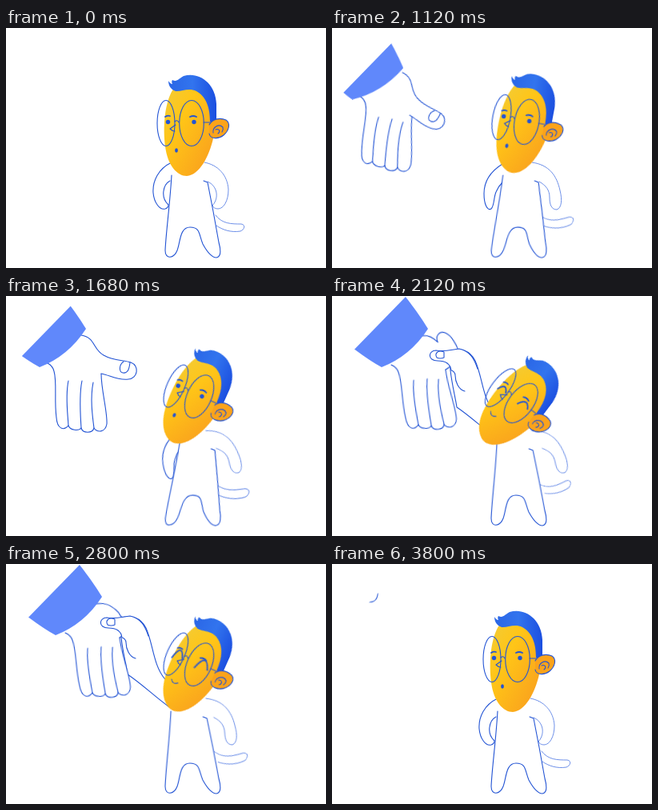
An HTML page without scripts for the animation above (3840 ms loop, 400x300 px).

```html
<!DOCTYPE html>
<html lang="en">
<head>
<meta charset="utf-8">
<title>Handshake</title>
<style>
html, body { margin: 0; width: 100%; height: 100%; overflow: hidden; background: #fff; }
svg { display: block; width: 100vw; height: 100vh; }
.line { fill: none; stroke: #2354d4; stroke-width: 1.1; stroke-linecap: round; stroke-linejoin: round; }
.skin { fill: #fff; }
.thin { stroke: #4a74e2; stroke-width: .8; }
.bold { stroke-width: 1.8; }
.ink { fill: #2354d4; stroke: none; }

/* Each part turns about its own joint. */
.move { animation: 3.84s ease-in-out infinite; }
.toggle { animation: 3.84s step-end infinite; }
.head { animation-name: head; transform-origin: 219px 117px; }
.torso { animation-name: torso; transform-origin: 230px 280px; }
.tail { animation-name: tail; transform-origin: 264px 240px; }
.left-arm { animation-name: left-arm, left-bend; transform-origin: 213px 169px; }
.right-arm { animation-name: right-arm, right-bend; transform-origin: 252px 170px; }
.reach { animation-name: reach; transform-origin: 200px 165px; }
.slide { animation-name: slide; transform-origin: 73px 66px; }
.palm { animation-name: palm; transform-origin: 73px 66px; }
.thumb-turn { animation-name: thumb-turn; transform-origin: 110px 80px; }
.thumb { animation-name: thumb; }
.smile-eye { animation-name: smile-eye; transform-box: fill-box; transform-origin: center; vector-effect: non-scaling-stroke; }
.apart { animation-name: apart; }
.together { animation-name: together; }
.neutral { animation-name: neutral; }
.happy { animation-name: happy; }

@keyframes head {
  0%, 9%, 98.9%, 100% { transform: none; }
  29.17% { transform: translate(12px, -4px) rotate(10.6deg); }
  43.75%, 72.9% { transform: translate(11.5px, 1.5px) rotate(24deg); }
  55.2% { transform: translate(8px, 7.5px) rotate(37deg); }
  86.46% { transform: translate(16px, -4px) rotate(12.8deg); }
}
@keyframes torso {
  0%, 9%, 98.9%, 100% { transform: none; }
  29.17%, 86.46% { transform: skewX(-4deg); }
  43.75% { transform: skewX(-6deg); }
  55.2%, 72.9% { transform: skewX(.5deg); }
}
@keyframes tail {
  0%, 98.9%, 100% { transform: none; }
  29.17%, 72.9% { transform: rotate(-16deg) scale(1.08); }
  43.75%, 86.46% { transform: rotate(-8deg) scale(1.15); }
  55.2% { transform: rotate(-27deg); }
}
@keyframes left-arm {
  0%, 29.17%, 98.9%, 100% { transform: none; }
  43.75%, 86.46% { transform: rotate(-9deg); }
}
@keyframes left-bend {
  0%, 9%, 98.9%, 100% { d: path("M207 168C190 176 183 192 184 206C185 218 192 228 199 226C202 225 203 223 203 221C193 212 196 196 205 191"); }
  29.17%, 86.46% { d: path("M213 170C197 180 190 193 190 207C190 220 194 229 199 226C203 222 202 212 205 205C207 200 210 196 213 193"); }
}
@keyframes right-arm {
  0%, 29.17%, 98.9%, 100% { transform: none; }
  43.75%, 55.2% { transform: rotate(-10deg); }
  72.9%, 86.46% { transform: rotate(-2deg); }
}
@keyframes right-bend {
  0%, 9%, 98.9%, 100% { d: path("M248 168C265 171 277 184 278 202C278 216 272 226 265 226C261 226 259 224 258 222C267 212 264 197 252 192"); }
  29.17%, 86.46% { d: path("M250 168C272 171 281 185 285 203C288 215 287 225 281 227C274 227 272 220 272 212C272 203 268 197 259 192"); }
}
@keyframes reach {
  0%, 45.8%, 81.3%, 100% { transform: rotate(-70deg) scale(.55); }
  55.2% { transform: translate(4px, 1px); }
  73% { transform: none; }
}

@keyframes slide {
  0%, 15.3% { transform: translate(-60px, -134px) rotate(8deg); animation-timing-function: ease-out; }
  29.17% { transform: translate(-14px, 5px) rotate(8deg); }
  43.75% { transform: none; }
  55.2%, 72.9% { transform: translate(20px, 0); }
  86.46% { transform: translate(-6px, 1px) rotate(2deg); animation-timing-function: ease-in; }
  98.96% { transform: translate(-65.5px, -123px) rotate(2deg); }
  100% { transform: translate(-74px, -136px) rotate(2deg); }
}
@keyframes palm {
  0%, 43.75%, 86.46%, 100% { transform: none; }
  55.2%, 72.9% { transform: rotate(-6deg); }
}
@keyframes thumb-turn {
  0%, 29.17% { transform: rotate(10deg); }
  43.75%, 100% { transform: none; }
}
@keyframes thumb {
  0%, 43.75%, 86.46%, 100% { d: path("M94 49C112 52 108 66 122 74C134 81 146 80 156 83C167 87 165 103 153 104C140 106 130 99 119 97"); }
  55.2% { d: path("M94 52C101 51 108 56 113 62C110 54 116 48 123 51C131 55 136 68 138 77C138 84 130 92 119 97"); }
  72.9% { d: path("M94 52C106 51 112 56 118 62C120 64 122 67 123 70C127 74 129 80 128 86C126 92 123 95 119 97"); }
}

@keyframes smile-eye {
  0%, 55.2% { transform: none; }
  72.9% { transform: scale(1.15, 1.8); }
  86.46%, 100% { transform: scale(.75, .5); }
}
@keyframes apart { 0%, 81.3% { opacity: 1; } 45.8% { opacity: 0; } }
@keyframes together { 0%, 81.3% { opacity: 0; } 45.8% { opacity: 1; } }
@keyframes neutral { 0%, 92% { opacity: 1; } 49% { opacity: 0; } }
@keyframes happy { 0%, 92% { opacity: 0; } 49% { opacity: 1; } }
</style>
</head>
<body>
<svg viewBox="0 0 400 300">
  <defs>
    <linearGradient id="face" x1=".1" y1="0" x2=".9" y2=".8">
      <stop offset="0" stop-color="#f3cb35"/>
      <stop offset=".4" stop-color="#ffc517"/>
      <stop offset="1" stop-color="#faa41d"/>
    </linearGradient>
    <linearGradient id="hair">
      <stop offset="0" stop-color="#2a66e6"/>
      <stop offset=".5" stop-color="#3274ee"/>
      <stop offset="1" stop-color="#1b4fe0"/>
    </linearGradient>
    <clipPath id="slot"><path d="M-10 105.8L110 -17.6H400V300H-10Z"/></clipPath>
  </defs>

  <path class="line thin skin move tail" d="M262 234C270 245 282 245 294 245C300 246 298 252 293 254C281 256 270 252 263 247"/>
  <path class="line thin skin move right-arm"/>
  <g class="toggle apart"><path class="line skin move left-arm"/></g>
  <g class="toggle together">
    <path class="line skin move reach" d="M212 154L198 143C184 126 184 100 175 80C168 66 155 64 144 67V92C146 110 150 125 152 138C170 150 185 165 203 178L210 182"/>
  </g>
  <path class="line skin move torso" d="M207 184C205 220 200 255 199 278C199 290 210 288 214 278C218 268 217 249 230 249C243 249 241 258 246 270C252 281 257 287 263 287C270 286 268 275 266 268C262 245 257 218 252 193L247 191"/>

  <g class="move head">
    <path fill="url(#face)" d="M208 78C198 95 196 125 199 148C202 172 214 185 226 185C242 184 254 160 259 138C263 115 262 90 250 75C240 65 218 66 208 78Z"/>
    <path fill="url(#hair)" d="M203 66C204 68 206 70 208 70C207 68 207 66 208 65C214 68 216 63 222 60C240 54 262 68 263 95V117H255C255 101 251 86 238 79C228 74 219 80 212 79C206 77 203 72 203 66Z"/>
    <g class="line">
      <path fill="#fba31a" d="M254 121C258 113 268 112 275 115C281 119 279 128 272 134C264 140 255 138 254 132"/>
      <path d="M259 131C258 124 266 119 271 124Q272 127 270 130M262 127C267 125 268 130 265 132"/>
      <ellipse cx="200" cy="119" rx="11" ry="28.5"/>
      <ellipse cx="232" cy="119" rx="15.3" ry="28.5"/>
      <path d="M247 118H255M211 117Q214 114 216 118M212 121L205 126Q208 129 211 129"/>
      <path class="bold" d="M199 111Q202 109 205 110M230 111Q234 109 238 111"/>
    </g>
    <g class="ink toggle neutral">
      <circle cx="202.5" cy="117.5" r="2.7"/>
      <circle cx="235" cy="117.5" r="2.7"/>
      <ellipse cx="213" cy="153" rx="1.9" ry="2.7"/>
    </g>
    <g class="line toggle happy">
      <path class="bold move smile-eye" d="M198 122Q203 109 209 120"/>
      <path class="bold move smile-eye" d="M229 122Q236 108 243 120"/>
      <path d="M208 150Q212 156 217 151"/>
    </g>
  </g>

  <g clip-path="url(#slot)">
    <g class="move slide">
      <g class="line move palm">
        <path class="skin" d="M119 97C119 118 127 145 126 160C124 171 114 171 110 165C108 172 96 172 94 165C91 169 80 168 78 162C72 169 64 166 63 152C60 130 64 108 60 94C59 90 56 86 52 84"/>
        <path d="M78 106C74 125 77 145 78 162M95 106C91 125 93 148 94 165M109 108C105 128 108 150 110 165"/>
        <g class="move thumb-turn">
          <path class="skin move thumb"/>
          <path class="toggle apart" d="M147 82C141 86 141 95 146 96C152 97 154 92 155 83"/>
        </g>
      </g>
      <path fill="#6088fb" d="M16 -63Q74 -2 100 41Q78 75 42 89Q14 74 -38 29Z"/>
    </g>
  </g>

  <g class="toggle together">
    <path class="line skin move reach" d="M162 118C154 116 150 106 150 98C150 95 147 92 145 92C144 84 138 80 128 80C115 80 116 67 126 67C138 69 145 66 155 65C169 68 174 78 178 90M136 69C128 66 124 71 127 76Q131 78 136 76Z"/>
  </g>
</svg>
</body>
</html>
```
